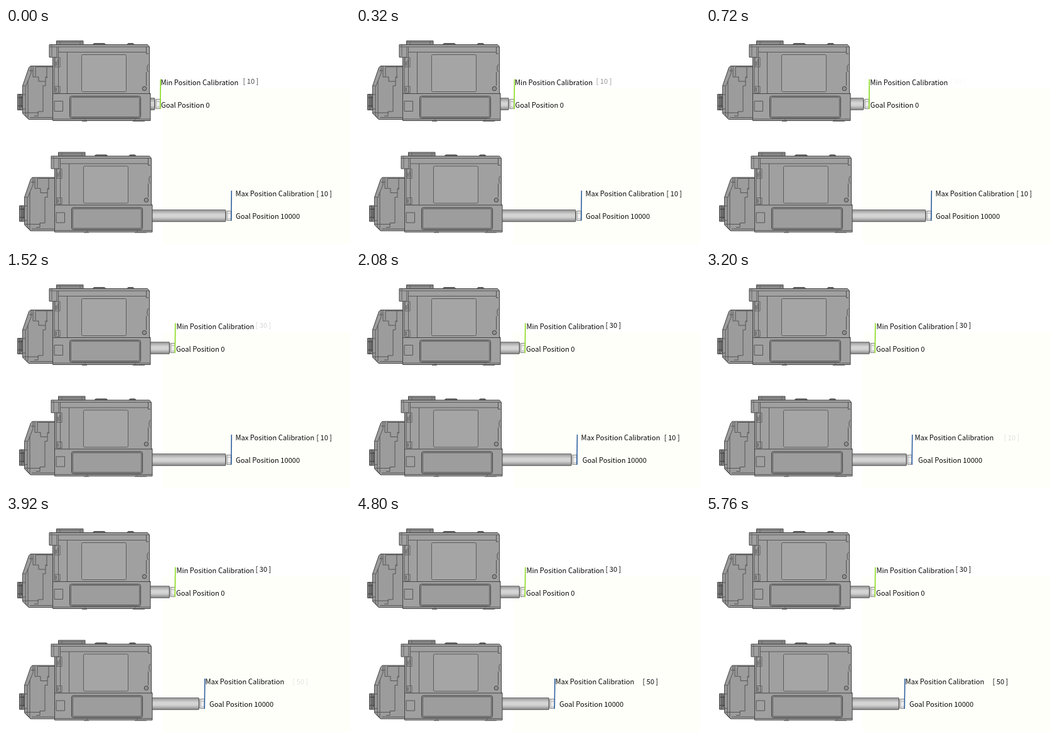
Recreate the animation shown at these times as an HTML page. Size 548x344 px, loop 6160 ms.

```html
<!DOCTYPE html>
<html lang="en">
<head>
<meta charset="utf-8">
<title>Position calibration</title>
<style>
  html, body { margin: 0; width: 100%; height: 100%; overflow: hidden; background: #fff; }
  svg { display: block; width: 548px; height: 344px; }
  text { font: 11.15px "Noto Sans CJK KR", "Noto Sans CJK JP", "Noto Sans CJK SC", "Noto Sans", sans-serif; fill: #080808; }
</style>
</head>
<body>
<svg viewBox="0 0 548 344">
  <defs>
    <linearGradient id="steel" x2="0" y2="1">
      <stop offset="0" stop-color="#8a8a8a"/>
      <stop offset=".18" stop-color="#b4b4b4"/>
      <stop offset=".4" stop-color="#d6d6d6"/>
      <stop offset=".62" stop-color="#d2d2d2"/>
      <stop offset=".82" stop-color="#acacac"/>
      <stop offset="1" stop-color="#787878"/>
    </linearGradient>

    <!-- Rod with its end face at x = 0 -->
    <g id="rod" stroke="#666" stroke-width=".8">
      <path d="M-160 111.5H-9.5V130.5H-160Z" fill="url(#steel)"/>
      <path d="M-8.500 115L-7 113.500H0V128.500H-7L-8.500 127Z" fill="#ededed"/>
      <path d="M-9 112V130" fill="none" stroke="#555"/>
      <path d="M-6.500 114V128M-6 117H0M-6 126H0" fill="none" stroke="#999"/>
    </g>

    <g id="body" fill="#a0a0a0" stroke="#404040" stroke-width="1" stroke-linejoin="round">
      <path d="M18.500 105.500H27V130.500H18.500Z" fill="#858585"/>
      <path d="M18.500 111H26M18.500 124H26M22 105.500V130M24.500 108V127" fill="none"/>
      <path d="M80.500 26.500V20.500H123V26.500Z" fill="#919191"/>
      <path d="M81 23H122M86 20.500V26M118 20.500V26" fill="none" stroke="#666"/>
      <path d="M138 26.500L140 24.500H157L159 26.500ZM193 26.500L194.500 24.500H202.500L204 26.500Z" fill="#777"/>
      <path d="M36.500 63L39 60.500H74.500V145.500H36L26.500 136V92Z" fill="#9c9c9c"/>
      <path d="M69 26.500H225.500L228.500 30V104H230V147.500H74.500V46.500H69Z"/>

      <!-- Gear case -->
      <g fill="none" stroke="#555">
        <path d="M40 61V72L31 94V139L36 145M43 61V78H47V62H74"/>
        <path d="M48 78H52V85H63V78H66M63 85V92H59V133H51V140H45"/>
        <path d="M26 92H31M26 106H31M26 129H31M35 84V142M37 68H43M65 62V80"/>
        <path d="M26 135H52M38 142.500H74"/>
        <path d="M77 116.500H90.500V132.500H77Z"/>
      </g>

      <!-- Housing -->
      <g fill="none">
        <path d="M69 30H228M74.500 46.500H81V30M77 46V103M83.500 30V103M83.500 38.500H223M97.500 38.500V104" stroke="#585858"/>
        <path d="M74.500 104.500H230" stroke="#444"/>
        <path d="M73 27V45M78 47H86V62H78ZM78 93H86V103H78Z" stroke="#606060"/>
        <path d="M80 53V60M80 95V101M83 50V60" stroke="#444"/>
        <path d="M223.500 30V41H227M227 58L225 61V68L227 70M223.500 70V92" stroke="#505050"/>
        <path d="M74.500 145H230M126 147.500V145M206 147.500V145" stroke="#585858"/>
        <path d="M121 148.300H129M202 148.300H221" stroke="#555"/>
        <circle cx="220.500" cy="96.500" r="3.300" fill="#909090"/>
        <rect x="120.500" y="42.500" width="71" height="59" rx="2" fill="#a5a5a5" stroke="#555" stroke-width=".9"/>
        <rect x="101.500" y="108.500" width="113" height="35" rx="3" fill="#929292" stroke="#404040"/>
        <rect x="103.500" y="110.500" width="109" height="31" rx="2" fill="#9d9d9d" stroke="#505050" stroke-width=".8"/>
      </g>
    </g>
  </defs>

  <rect x="250" y="96" width="298" height="248" fill="#fffffa"/>

  <g id="minRod"><use href="#rod"/></g>
  <use href="#body"/>
  <g transform="translate(0 178)"><g id="maxRod"><use href="#rod"/></g></g>
  <use href="#body" x="3" y="177.500"/>

  <path id="minLine" d="M.3 81.500L-.3 129" stroke="#8fdc28" stroke-width="1.700"/>
  <path id="maxLine" d="M.3 259L-.3 307" stroke="#2d5f9d" stroke-width="1.600"/>

  <text id="minText" y="91">Min Position Calibration</text>
  <text id="minGoal" y="127">Goal Position 0</text>
  <text id="minOld" y="89">[ 10 ]</text>
  <text id="minNew" y="89">[ 30 ]</text>
  <text id="maxText" y="268">Max Position Calibration</text>
  <text id="maxGoal" y="304">Goal Position 10000</text>
  <text id="maxOld" y="268">[ 10 ]</text>
  <text id="maxNew" y="268">[ 50 ]</text>
</svg>
<script>
const LOOP = 6160, STEP = 80;
const MIN_TIMES = [0, 720, 1240];
const MAX_TIMES = [1760, 2560, 3200, 3760];

const track = (times, values) => times.map((t, i) => [t, values[i]]);
const minTrack = (...values) => track(MIN_TIMES, values);
const maxTrack = (...values) => track(MAX_TIMES, values);
const still = x => [[0, x]];

const minEnd = minTrack(246, 260, 269.5);
const maxEnd = maxTrack(359, 342, 328.4, 316.5);

const parts = {
  minRod: { x: minEnd },
  minLine: { x: minEnd },
  minText: { x: minTrack(246.4, 261.4, 271.4) },
  minGoal: { x: minTrack(247, 261.8, 271) },
  minOld: { x: minTrack(377.5, 389, 389), fade: [[0, .75], [720, .03], [800, 0]] },
  minNew: { x: still(397.5), fade: [[1440, 0], [1920, 1]] },
  maxRod: { x: maxEnd },
  maxLine: { x: maxEnd },
  maxText: { x: maxTrack(365.4, 348.4, 332.4, 317.4) },
  maxGoal: { x: maxTrack(366, 353, 338, 324) },
  maxOld: { x: maxTrack(494.5, 485.5, 474.5, 465), fade: [[2080, 1], [2560, .65], [3200, .13], [3360, 0]] },
  maxNew: { x: still(456.5), fade: [[3840, 0], [4560, 1]] }
};

function valueAt(points, t) {
  const next = points.findIndex(p => p[0] > t);
  if (next === 0) return points[0][1];
  if (next < 0) return points[points.length - 1][1];
  const [t0, a] = points[next - 1], [t1, b] = points[next];
  return a + (b - a) * (t - t0) / (t1 - t0);
}

function draw(t) {
  for (const [id, { x, fade }] of Object.entries(parts)) {
    const el = document.getElementById(id);
    el.setAttribute("transform", `translate(${valueAt(x, t).toFixed(2)} 0)`);
    if (fade) el.setAttribute("opacity", valueAt(fade, t).toFixed(3));
  }
}

const start = performance.now();
function tick() {
  const t = (performance.now() - start) % LOOP;
  draw(Math.floor(t / STEP) * STEP);
  requestAnimationFrame(tick);
}
tick();
</script>
</body>
</html>
```
